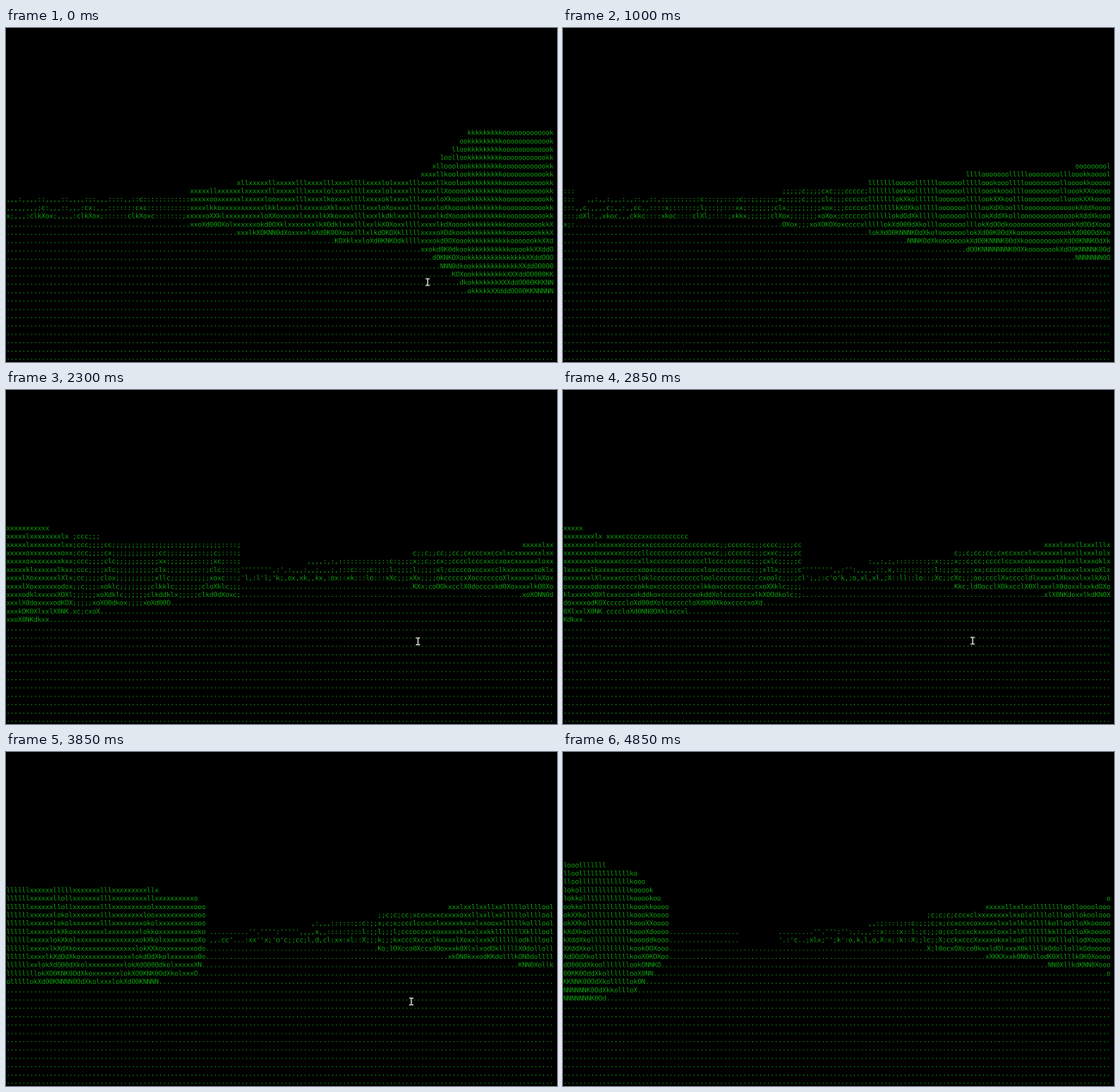
An HTML page with a canvas for the animation above (5.25 s loop, 640 by 389 pixels).

```html
<!DOCTYPE html>
<html lang="en">
<head>
<meta charset="utf-8">
<title>ASCII walk</title>
<style>
  html, body { margin: 0; width: 100%; height: 100%; overflow: hidden; background: #000; }
  canvas { display: block; width: 640px; height: 389px; }
</style>
</head>
<body>
<canvas id="view" width="1280" height="778"></canvas>
<script>
const ctx = document.getElementById('view').getContext('2d');
const LOOP = 5250, STEP = 50, LAST = 4850;
const COLS = 140, ROWS = 40, CELL_W = 4.54, CELL_H = 9.7, HORIZON = 21;
const RAMP = ".',:;cxlokXdO0KN";

const clamp = (v, a, b) => Math.max(a, Math.min(b, v));
const mix = (a, b, k) => a + (b - a) * k;
const after = (s, start) => Math.max(0, s - start);
const ease = (s, a, b) => {
  const k = clamp((s - a) / (b - a), 0, 1);
  return k * k * (3 - 2 * k);
};

// Each wall turns a column x into { h: half height, b: shade, u: place along the wall },
// or nothing where it is not in view. s is the time in seconds.

// Nearby corner that slides off to the right
function corner(s) {
  const edge = 482 + 520 * s * s, width = 50 + 130 * s, tall = 8.6 + 13 * s;
  return x => {
    if (x < edge) return null;
    const k = (x - edge) / width;
    return k < 1
      ? { h: mix(4, tall, k), b: 6 + 2.5 * k, u: k }
      : { h: tall, b: 8.6, u: (x - edge - width) / 250 };
  };
}

function rightWall(s) {
  const edge = 212 + 45 * s + 99 * s * s;
  const tall = Math.min(6.3, 2.75 + 0.4 * s ** 4);
  const run = Math.max(50, 225 - 95 * s), gap = 65 + 40 * s;
  return x => x < edge ? null : {
    h: tall + (x - edge) / run,
    b: 6 + 1.35 * s + (x - edge) / 500,
    u: (x - edge) / gap + 0.1
  };
}

// Pillar that swings in and out at the left border
function pillar(s) {
  const edge = 76 - 110 * (s - 2.35) ** 2;
  return x => x >= edge ? null : {
    h: Math.min(5.2, 3.8 + (edge - x) / 20), b: 6, u: (edge - x) / 40 + 0.25
  };
}

// Left wall: a front, and a receding side once the camera comes close
function leftWall(s) {
  const edge = Math.min(200 * (s - 0.93), 280 - 40 * after(s, 2.6) ** 2);
  const tall = 2 + 1.05 * ease(s, 1.4, 2.4) + 0.4 * after(s, 2.4) + 2.7 * after(s, 3.4);
  const run = 170 + 230 * after(s, 3.4);
  const gap = 48 + 6 * s + 22 * after(s, 2.5);
  const shade = Math.min(7, 3 + 1.6 * after(s, 2));
  const side = 34 * after(s, 3.5);
  const even = s > 4;
  return x => {
    if (x < edge) {
      const rise = (edge - x) / run;
      return { h: tall + rise, b: shade + 0.8 * rise, u: (edge - x) / gap, even };
    }
    if (x >= edge + side) return null;
    const k = (x - edge) / side;
    return { h: mix(tall, 3, k), b: 8.4 - 0.6 * k, u: k, even };
  };
}

function farWall(s) {
  const start = 352 * ease(s, 0.7, 2.4);
  const run = 58 + 330 * Math.exp(-s / 1.45);
  return x => {
    const d = 1 + (x - start) / run;
    const h = d - after(d, 3) / 2;
    return { h: Math.max(h, 0), b: 2 * h, u: -70 / (Math.max(d, -0.5) + 2), depth: d };
  };
}

function texture(wall, v) {
  const off = Math.abs(wall.u - Math.floor(wall.u) - 0.5);
  const bump = 7 * v + 12 * after(v, 0.65) - 24 * off;
  const wave = 0.5 * (1 - v) * Math.cos(4 * Math.PI * wall.u);
  const shade = Math.max(0, wall.b) + Math.max(0, bump) + wave;
  return RAMP[clamp(Math.round(shade), 0, RAMP.length - 1)];
}

function glyph(wall, row) {
  const y = row - HORIZON;
  const low = Math.max(wall.h, 1) + (wall.even ? 0 : clamp(wall.h - 3, 0, 1));
  if (y < -wall.h || y > low) return y > 0 ? '.' : ' ';
  if (wall.depth < -0.45) return wall.depth > -1.1 ? ' ' : '.';
  return texture(wall, (y + wall.h + 0.3) / (wall.h + low + 0.6));
}

function drawPointer(s) {
  if (s >= 4.1 || (s >= 0.8 && s < 1.2)) return;
  const x = 490 - 5 * s, y = 296 - 1.4 * s;
  ctx.fillStyle = '#d8d8d8';
  ctx.fillRect(x - 0.6, y - 4, 1.3, 8);
  ctx.fillRect(x - 2.5, y - 4.5, 5, 1.2);
  ctx.fillRect(x - 2.5, y + 3.3, 5, 1.2);
}

function draw(s) {
  const walls = [leftWall(s), farWall(s)];
  if (s < 3.4) walls.unshift(pillar(s));
  if (s < 2.1) walls.unshift(rightWall(s));
  if (s < 0.6) walls.unshift(corner(s));

  ctx.setTransform(2, 0, 0, 2, 0, 0);
  ctx.fillStyle = '#000';
  ctx.fillRect(0, 0, 640, 389);
  ctx.font = '7.9px "DejaVu Sans Mono", monospace';
  ctx.fillStyle = '#10a010';
  for (let c = 0; c < COLS; c++) {
    const x = c * CELL_W;
    let hit = null;
    for (const wall of walls) hit = hit || wall(x + CELL_W / 2);
    for (let r = 0; r < ROWS; r++) {
      const g = glyph(hit, r);
      if (g !== ' ') ctx.fillText(g, x + 0.2, r * CELL_H + 8.2);
    }
  }
  drawPointer(s);
}

let shown = -1;
function tick() {
  const t = performance.now() % LOOP;
  const pose = clamp(Math.floor(t / STEP) * STEP, STEP, LAST);
  if (pose !== shown) draw((shown = pose) / 1000);
  requestAnimationFrame(tick);
}
tick();
</script>
</body>
</html>
```
